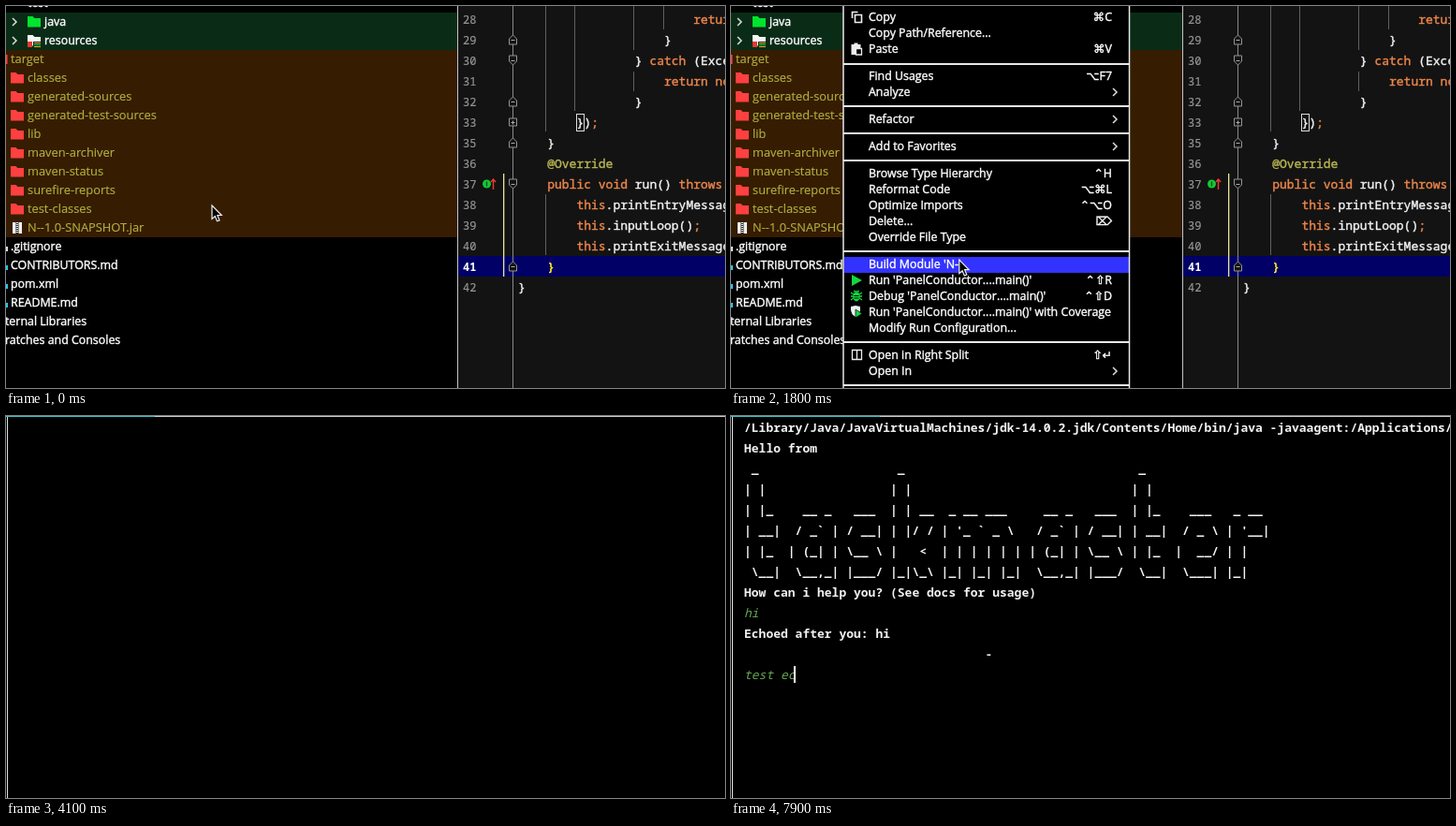
Recreate the animation shown at these times as an HTML page. Size 768 by 408 pixels, loop 8 s.

```html
<!DOCTYPE html>
<html lang="en">
<head>
<meta charset="utf-8">
<title>Run from the IDE</title>
<style>
html, body { margin: 0; width: 100%; height: 100%; overflow: hidden; background: #000; }
svg { display: block; width: 100vw; height: 100vh; }
text { white-space: pre; fill: currentColor; stroke: currentColor; stroke-width: .4; }
.ui { font: 400 12.4px "Open Sans", "DejaVu Sans", sans-serif; color: #fff; }
.out { font-size: 12.85px; color: #b0b040; stroke-width: .15; }
.mono { font: 400 13px "Noto Sans Mono", "DejaVu Sans Mono", monospace; color: #f2f2f2; }
.num { font-size: 12px; color: #949494; stroke-width: .2; }
.kw { color: #ed864a; }
.ann { color: #b8b552; }
.now { font-weight: 700; color: #ffe72e; stroke: none; }
.now.num { color: #fff; }
.print { font-weight: 600; stroke: none; }
.in { font-style: italic; color: #62a850; stroke: none; }
</style>
</head>
<body>
<svg id="stage" viewBox="0 0 768 408"></svg>
<script>
const LOOP = 8000, CH = 7.8, ROW = 22;
const esc = s => s.replace(/&/g, '&amp;').replace(/</g, '&lt;');
const text = (x, y, s, cls, extra = '') => `<text x="${x}" y="${y}" class="${cls}" ${extra}>${esc(s)}</text>`;
const rect = (x, y, w, h, fill, extra = '') => `<rect x="${x}" y="${y}" width="${w}" height="${h}" fill="${fill}" ${extra}/>`;
const path = (d, stroke, w = 1, fill = 'none') => `<path d="${d}" fill="${fill}" stroke="${stroke}" stroke-width="${w}"/>`;
const group = (id, body) => `<g id="${id}">${body}</g>`;
const chevron = (x, y) => path(`M${x} ${y - 4}l4 4l-4 4`, '#ddd', 1.5);
const folder = (x, y, fill) => path(`M${x} ${y - 6}h5.5l2 2h6.500v9.500h-14z`, 'none', 0, fill);

function tree() {
  let s = rect(0, 0, 482, 408, '#000') + rect(0, 7, 482, 40, '#0a2c17') + rect(0, 47, 482, 200, '#361c00');
  s += text(23, 1, 'test', 'ui');
  s += chevron(7, 17) + folder(23, 17, '#00e52e') + text(41, 21, 'java', 'ui');
  s += chevron(7, 37) + folder(23, 37, '#f4f4f4') + text(41, 41, 'resources', 'ui');
  s += rect(23, 38, 5, 6, '#e33a30') + rect(29, 38, 8, 7, '#0a2c17');
  [39, 41, 43].forEach((y, i) => s += rect(30, y, 7, 1, i % 2 ? '#35c94a' : '#f0b429'));
  s += rect(0, 52, 1.5, 10, '#ff4040') + text(5, 61, 'target', 'ui out');
  ['classes', 'generated-sources', 'generated-test-sources', 'lib', 'maven-archiver',
    'maven-status', 'surefire-reports', 'test-classes'].forEach((name, i) => {
    const y = 77 + 20 * i;
    s += folder(5, y, '#ff4040') + text(23, y + 4, name, 'ui out');
  });
  s += rect(7, 231, 10, 12, '#f0f0f0') + path('M12 231v12', '#222', 3);
  s += path('M12 231v12', '#eee', 2).replace('/>', ' stroke-dasharray="1 1"/>');
  s += text(23, 241, 'N--1.0-SNAPSHOT.jar', 'ui out');
  ['.gitignore', 'CONTRIBUTORS.md', 'pom.xml', 'README.md'].forEach((name, i) => {
    const y = 257 + 20 * i;
    s += rect(0, y, 2, 5, i ? '#2cc5f0' : '#ddd') + text(5, y + 4, name, 'ui');
  });
  s += text(-1, 341, 'ternal Libraries', 'ui') + text(-1, 361, 'ratches and Consoles', 'ui');
  return s;
}

function fold(kind, y) {
  const shape = {
    end: `M537.5 ${y + 5}v-6l4-4l4 4v6z`,
    start: `M537.5 ${y - 5}v6l4 4l4-4v-6z`,
    plus: `M537.5 ${y - 4}h8v8h-8z`
  }[kind];
  const mark = `M539.5 ${y + .5}h4` + (kind === 'plus' ? `M541.5 ${y - 1.5}v4` : '');
  return path(shape, '#949494', 1, '#131313') + path(mark, '#aaa');
}

// number, indent in columns, [text, class] parts, fold marker
const code = [
  [28, 24, [['return', 'kw']]],
  [29, 20, [['}']], 'end'],
  [30, 16, [['} '], ['catch ', 'kw'], ['(Exception']], 'start'],
  [31, 20, [['return new', 'kw']]],
  [32, 16, [['}']], 'end'],
  [33, 8, [['})'], [';', 'kw']], 'plus'],
  [35, 4, [['}']], 'end'],
  [36, 4, [['@Override', 'ann']]],
  [37, 4, [['public void ', 'kw'], ['run() '], ['throws', 'kw']], 'start'],
  [38, 8, [['this', 'kw'], ['.printEntryMessage']]],
  [39, 8, [['this', 'kw'], ['.inputLoop()'], [';', 'kw']]],
  [40, 8, [['this', 'kw'], ['.printExitMessage']]],
  [41, 4, [['}']], 'end'],
  [42, 0, [['}']]]
];

function editor() {
  let s = rect(482, 0, 286, 408, '#131313') + rect(483, 267, 285, 22, '#000066');
  s += rect(482, 0, 1, 408, '#c4c4c4') + rect(541, 0, 1, 408, '#8a8a8a') + rect(531, 179, 1.3, 110, '#e8e6a0');
  s += path('M576.5 0V134M607.5 0V112M670.5 0V47M670.5 70V91M702.5 0V25M576.5 201V266', '#606060');
  code.forEach(([n, col, parts, marker], i) => {
    const y = 14 + ROW * i, now = n === 41 ? ' now' : '';
    s += text(488, y + 5, String(n), 'mono num' + now);
    if (marker) s += fold(marker, y);
    let c = col;
    for (const [str, cls = ''] of parts) {
      s += text(547 + c * CH, y + 5, str, 'mono ' + cls + now);
      c += str.length;
    }
  });
  s += rect(609.5, 115.5, 8, 18, 'none', 'stroke="#ddd"');
  s += '<circle cx="513.5" cy="190" r="4.5" fill="#14c832"/>' + path('M513.5 187.5v5', '#053', 1.4);
  s += path('M520.5 196v-10M518 188l2.5-3l2.5 3', '#f0392f', 1.4);
  return s;
}

const items = [
  [12, 'Copy', '⌘C'], [29, 'Copy Path/Reference...'], [46, 'Paste', '⌘V'],
  [75, 'Find Usages', '⌥F7'], [92, 'Analyze', '>'], [121, 'Refactor', '>'], [150, 'Add to Favorites', '>'],
  [179, 'Browse Type Hierarchy', '⌃H'], [196, 'Reformat Code', '⌥⌘L'], [213, 'Optimize Imports', '⌃⌥O'],
  [230, 'Delete...', '⌦'], [247, 'Override File Type'], [276, "Build Module 'N-'"],
  [293, "Run 'PanelConductor....main()'", '⌃⇧R'], [310, "Debug 'PanelConductor....main()'", '⌃⇧D'],
  [327, "Run 'PanelConductor....main()' with Coverage"], [344, 'Modify Run Configuration...'],
  [373, 'Open in Right Split', '⇧↵'], [390, 'Open In', '>']
];

function menu() {
  let s = rect(120, -5, 306, 420, '#000') + rect(121, 0, 304, 17, '#3333ff', 'id="hot"');
  s += path('M120 0V408M425.5 0V408', '#e8e8e8', 1.5);
  [62, 107, 136, 165, 262, 359, 405].forEach(y => s += rect(120, y - 1, 305, 2, '#e8e8e8'));
  for (const [y, label, key] of items) {
    s += text(147, y + 4, label, 'ui');
    if (key === '>') s += chevron(408, y);
    else if (key) s += text(407, y + 4, key, 'ui', 'text-anchor="end"');
  }
  s += path('M129.5 13V6.5h6M132.5 9.5h7v8h-7z', '#eee', 1.6);
  s += rect(128.5, 41, 10, 11, '#eee') + rect(131.5, 39.5, 4, 3, '#eee') + path('M133.5 45.5h6v6.5h-6z', '#eee', 1.3, '#000');
  s += path('M129 287l11 6l-11 6z', 'none', 0, '#14d840');
  s += path('M128 306l12 8M140 306l-12 8M128 310h12M131 304l6 2M137 304l-6 2', '#14d840', 1.3);
  s += '<ellipse cx="134" cy="310.5" rx="3.6" ry="5" fill="#14d840"/>' + path('M131.5 309.5h5M131.5 312h5', '#000');
  s += path('M128 321l5-1l5 1v5l-5 6q-5-3-5-8z', 'none', 0, '#f0f0f0') + path('M133 324l7 4.5l-7 4.5z', '#000', .7, '#14d840');
  s += path('M129.5 367.5h10v10h-10zM134.5 367v11', '#eee', 1.3);
  return s;
}

const banner = [
  ' _' + ' '.repeat(19) + '_' + ' '.repeat(32) + '_',
  '| |' + ' '.repeat(17) + '| |' + ' '.repeat(30) + '| |',
  "| |_    __ _   ___  | | __  _ __ ___     __ _   ___  | |_    ___   _ __ ",
  "| __|  / _` | / __| | |/ / | '_ ` _ \\   / _` | / __| | __|  / _ \\ | '__|",
  "| |_  | (_| | \\__ \\ |   <  | | | | | | | (_| | \\__ \\ | |_  |  __/ | |   ",
  " \\__|  \\__,_| |___/ |_|\\_\\ |_| |_| |_|  \\__,_| |___/  \\__|  \\___| |_|   "
];

// time, console row, text
const printed = [
  [4200, 0, '/Library/Java/JavaVirtualMachines/jdk-14.0.2.jdk/Contents/Home/bin/java -javaagent:/Applications/'],
  [4400, 1, 'Hello from'],
  ...banner.map((line, i) => [4400, 2 + i, line]),
  [4500, 8, 'How can i help you? (See docs for usage)'],
  [6600, 10, 'Echoed after you: hi'],
  [6700, 11, ' '.repeat(33) + '-']
];
const typed = [
  { row: 9, str: 'hi', keys: [6200, 6300] },
  { row: 12, str: 'test ec', keys: [7200, 7300, 7400, 7500, 7700, 7800, 7900] }
];
// time, row of the console caret
const carets = [[5300, 9], [6500, 10], [6700, 12]];

function terminal() {
  let s = rect(0, 0, 768, 408, '#000') + rect(1, 0, 1, 408, '#e0e0e0');
  s += rect(0, 0, 768, 1, '#d0d0d0') + rect(0, 0, 159, 1, '#35c3cf');
  printed.forEach(([, row, str], i) => s += text(14, 17 + ROW * row, str, 'mono print', `id="p${i}"`));
  typed.forEach(({ row }, i) => s += text(14, 17 + ROW * row, '', 'mono in', `id="t${i}"`));
  return s + rect(0, 0, 2, 18, '#fff', 'id="caret"');
}

const stage = document.getElementById('stage');
stage.innerHTML = group('tree', tree()) + group('editor', editor()) +
  rect(585, 269, 2, 18, '#fff', 'id="editCaret"') + group('menu', menu()) +
  group('mouse', path('M0 0V14.5L3.3 11.5L5.5 16.8L8 15.8L5.8 10.5H10.3z', '#eee', 1.2, '#000')) +
  group('term', terminal());
const $ = id => document.getElementById(id);
const show = (id, on) => $(id).style.display = on ? '' : 'none';

// time, x, y of the pointer tip
const track = [[600, 220, 213], [900, 120, -30], [1000, 120, -30], [1300, 229, 236],
  [1900, 245, 274], [2100, 245, 274], [2300, 249, 282]];

function pointer(t) {
  const k = track.findIndex(p => p[0] > t);
  if (k === 0) return track[0].slice(1);
  if (k < 0) return track[track.length - 1].slice(1);
  const [a, b] = [track[k - 1], track[k]];
  const u = (t - a[0]) / (b[0] - a[0]), e = u * u * (3 - 2 * u);
  return [a[1] + (b[1] - a[1]) * e, a[2] + (b[2] - a[2]) * e];
}

function draw(time) {
  const t = Math.floor(time / 100) * 100;
  const [x, y] = pointer(t);
  show('mouse', t < 3300);
  $('mouse').setAttribute('transform', `translate(${x} ${y})`);

  show('menu', t >= 1000 && t < 2000);
  const hit = items.find(it => Math.abs(it[0] - y - 10) <= 8.5);
  show('hot', hit);
  if (hit) $('hot').setAttribute('y', hit[0] - 8);

  show('editCaret', t >= 3900);
  show('term', t >= 4100);
  printed.forEach(([at], i) => show('p' + i, t >= at));
  const caret = carets.filter(c => c[0] <= t).pop();
  show('caret', caret);
  let col = 0;
  typed.forEach(({ row, str, keys }, i) => {
    const n = keys.filter(k => k <= t).length;
    $('t' + i).textContent = str.slice(0, n);
    if (caret && caret[1] === row) col = n;
  });
  if (caret) {
    $('caret').setAttribute('x', Math.round(13.6 + col * CH - (col ? 1 : 0)));
    $('caret').setAttribute('y', 3 + ROW * caret[1]);
  }
}

const start = performance.now();
function tick() {
  draw((performance.now() - start) % LOOP);
  requestAnimationFrame(tick);
}
tick();
</script>
</body>
</html>
```
